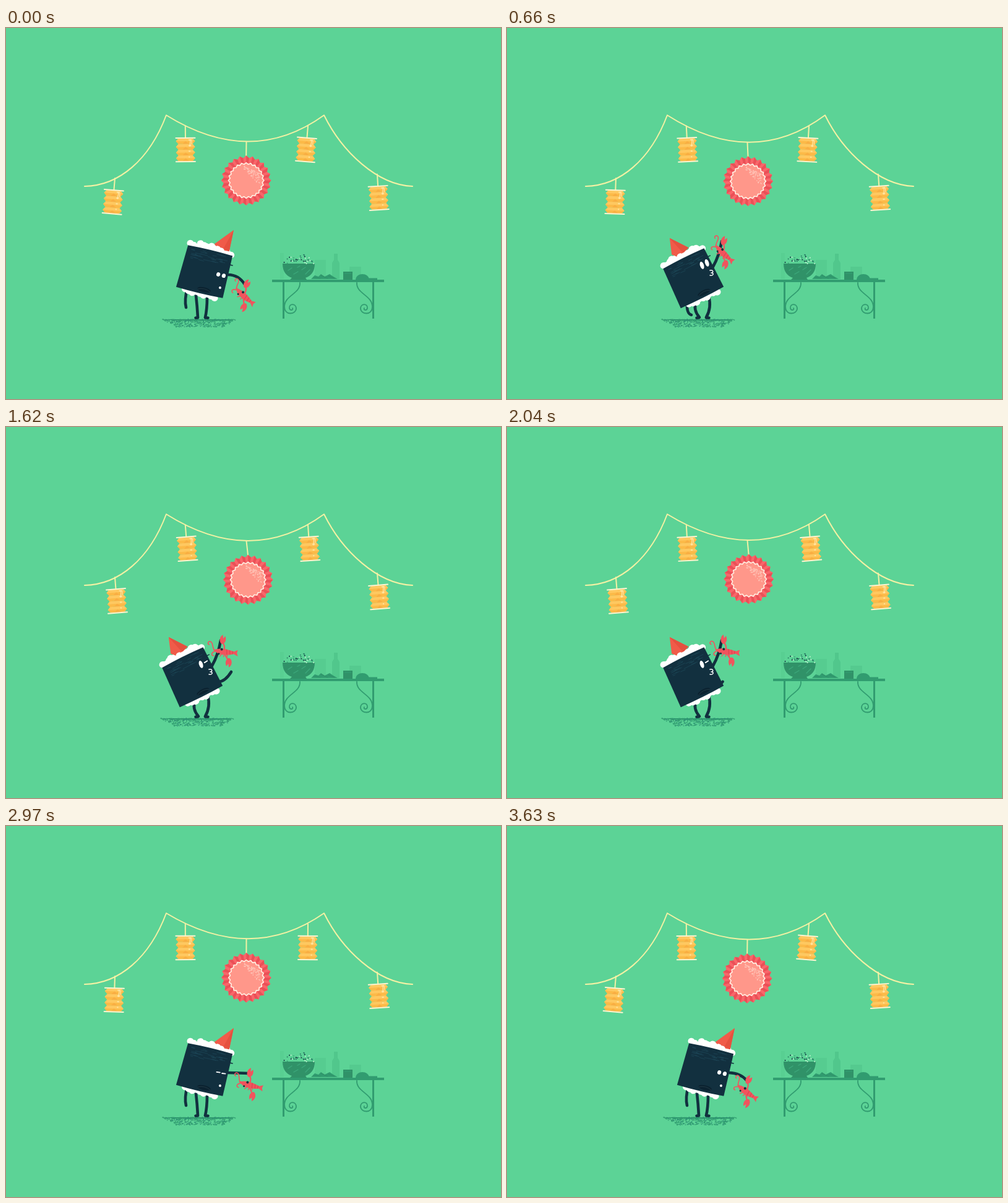
An HTML page with a canvas that plays this animation: 800x600 px, repeating every 3660 ms.

```html
<!DOCTYPE html>
<html>
<head>
<meta charset="utf-8">
<style>
html, body { margin: 0; width: 100%; height: 100%; overflow: hidden; background: #5cd396; }
canvas { display: block; }
</style>
</head>
<body>
<canvas id="stage" width="800" height="600"></canvas>
<script>
const ctx = document.getElementById('stage').getContext('2d');
const LOOP = 3660, TAU = Math.PI * 2, DEG = Math.PI / 180;
const NAVY = '#12303f', TABLE = '#319c70', DARK = '#309268', RED = '#f1545d', WIRE = '#f3f1a4';

const mix = (a, b, k) => a.map((v, i) => v + (b[i] - v) * k);
const swing = (t, shift = 0) => Math.cos(TAU * (t - shift) / LOOP);
function smooth(from, to, t) {
  const u = Math.min(1, Math.max(0, (t - from) / (to - from)));
  return u * u * (3 - 2 * u);
}
function random(seed) {
  return () => (seed = (seed * 16807) % 2147483647) / 2147483647;
}

function fill(d, color) { ctx.fillStyle = color; ctx.fill(new Path2D(d)); }
function stroke(d, color, width) {
  ctx.strokeStyle = color; ctx.lineWidth = width;
  ctx.lineCap = ctx.lineJoin = 'round';
  ctx.stroke(new Path2D(d));
}
function oval(x, y, rx, ry, color, turn = 0) {
  ctx.fillStyle = color;
  ctx.beginPath(); ctx.ellipse(x, y, rx, ry, turn, 0, TAU); ctx.fill();
}
function rect(x, y, w, h, color) { ctx.fillStyle = color; ctx.fillRect(x, y, w, h); }
function at(x, y, degrees, draw) {
  ctx.save(); ctx.translate(x, y); ctx.rotate(degrees * DEG); draw(); ctx.restore();
}
const limb = p => stroke(`M${p[0]} ${p[1]}Q${p[2]} ${p[3]} ${p[4]} ${p[5]}`, NAVY, 4.6);

function lantern(x, y, angle) {
  at(x, y, angle, () => {
    stroke('M0 0V19', WIRE, 2);
    for (let i = 0; i < 4; i++) {
      const top = 20 + i * 9.2;
      fill(`M-11.5 ${top}H11.5L15.5 ${top + 4.6}L11.5 ${top + 9.2}H-11.5L-15.5 ${top + 4.6}Z`, '#fcba48');
      fill(`M-11.5 ${top}H11.5L15.5 ${top + 4.6}H-15.5Z`, '#ffc860');
      fill(`M-5 ${top + 9.2}L0 ${top + 4.6}L6 ${top + 9.2}Z`, '#f9ae43');
      rect(5, top + 1.5, 5 - i, 2, '#ffe39b');
    }
    stroke('M8 22L7 33M10 24V29', '#ffe8ad', 1.2);
    stroke('M-15.5 19.3H15.5M-15.5 57.6H15.5', '#fff4cf', 2);
  });
}

function zigzag(count, outer, inner) {
  let d = '';
  for (let i = 0; i < count * 2; i++) {
    const r = i % 2 ? inner : outer, a = i * Math.PI / count;
    d += (i ? 'L' : 'M') + r * Math.cos(a) + ' ' + r * Math.sin(a);
  }
  return d + 'Z';
}

function rosette(x, y) {
  at(x, y, 0, () => {
    fill(zigzag(24, 40.5, 36.5), '#f9666a');
    for (let i = 0; i < 24; i++) {
      at(0, 0, i * 15, () => fill('M40 0L36.3 4.8L28 3.6V0Z', '#ea5057'));
    }
    fill(zigzag(24, 28.8, 26.2), '#ff978a');
    stroke(zigzag(24, 28.8, 26.2), '#fff1e4', 1.6);
    const r = random(91);
    for (let i = 0; i < 90; i++) {
      const u = r(), v = r();
      rect(-4 + u * 25, -24 + u * 12 + v * (5 + 15 * u * v), 1.6, 1.3, '#ffc2b5');
    }
  });
}

function garland(t) {
  const dip = 1.4 * Math.sin(TAU * t / LOOP);
  const x = 389.6 - 1.6 * swing(t, -260);
  stroke(`M127 256C183 255 232 213 259 141Q396 ${226 + 2 * dip} 514 141C543 200 600 254 657 256`, WIRE, 2);
  stroke(`M388.5 ${184 + dip}L${x} ${208 + dip}`, WIRE, 2);
  rosette(x, 246.6 + dip);
  lantern(176, 243, 4.8 * swing(t));
  lantern(289.8, 158.5, -2.2 + 2.2 * swing(t, -430));
  lantern(488, 158.5, 4.8 * swing(t, 170));
  lantern(600, 236.5, -4 + 0.7 * swing(t));
}

function table() {
  rect(443, 364, 6, 42, '#58cf92');
  rect(499, 375, 18, 31, '#56cc90');
  fill('M527 406V380L530 375V365H536V375L539 380V406Z', '#51c78c');
  rect(555, 386, 19, 20, '#55ca8f');
  rect(430, 407, 181, 4, TABLE);
  rect(447, 411, 3, 59, TABLE);
  rect(592, 411, 3, 59, TABLE);
  const scroll = 'M475 412C476 430 450 432 450 451C450 465 468 464 469 454C469 445 457 445 458 453C459 458 465 456 463 453';
  stroke(scroll, TABLE, 1.8);
  ctx.save(); ctx.translate(1042, 0); ctx.scale(-1, 1);
  stroke(scroll, TABLE, 1.8);
  ctx.restore();

  fill('M447 381H499C499 394 493 401 484 404L486 407H459L462 404C453 401 447 394 447 381Z', DARK);
  stroke('M456 392L462 388M465 398L472 394M478 391L484 387M484 398L491 391M471 387L475 385', '#3daa7c', 1.2);
  const r = random(37), tones = ['#c4f2d2', NAVY, '#2b7d66', '#3aa577'];
  for (let i = 0; i < 40; i++) {
    const a = r() * Math.PI, q = Math.sqrt(r());
    oval(474 + 25 * q * Math.cos(a), 381 - 15 * q * Math.sin(a), 1, 1, tones[i % 4]);
  }
  fill('M493 406L499 400L505 402L509 398L515 402L523 398L529 402L536 406Z', TABLE);
  stroke('M497 403L508 405M509 400L520 405M521 401L531 405', DARK, 1.2);
  rect(545, 394, 15, 13, DARK);
  rect(547, 396, 11, 1.5, TABLE);
  fill('M565 407C566 395 586 395 587 407Z', TABLE);
  rect(586, 404.5, 14, 2.5, TABLE);
}

function shadow(k) {
  const r = random(512), x0 = 312 - 3 * k;
  fill(`M${x0 - 50} 471H${x0 + 56}L${x0 + 50} 473.5H${x0 - 42}Z`, TABLE);
  for (let i = 0; i < 480; i++) {
    const v = r() ** 1.5, half = 60 * Math.sqrt(1 - v * 0.6);
    rect(x0 + (r() * 2 - 1) * half, 470.5 + v * 12.5, 1.5, 1.3, i % 5 ? TABLE : '#2d8c78');
  }
}

function shrimp(x, y, clawTurn, bodyTurn) {
  at(x, y, clawTurn, () => {
    stroke('M0 3Q5 9 1 17Q2 26 7 34', RED, 2.2);
    for (const [cx, cy, turn] of [[1, -1, 12], [7, 37, 190]]) {
      at(cx, cy, turn, () => fill('M-1 7C-6 3 -5 -5 0 -8L1 -2L4 -6C7 0 5 5 1 7Z', RED));
    }
  });
  const a = clawTurn * DEG;
  at(x + 2 * Math.cos(a) - 19 * Math.sin(a), y + 2 * Math.sin(a) + 19 * Math.cos(a), bodyTurn, () => {
    stroke('M-16 -1C-21 -3 -19 -12 -24 -14C-28 -15 -30 -10 -26 -9M-16 1C-21 3 -22 8 -17 8', RED, 1.6);
    fill('M-19 -1Q-6 -7 8 -3.5L15 -2L21 -5L20 0L22 5L15 2Q2 7 -10 4Z', RED);
    stroke('M3 -4L4 4M8 -3L9 3M13 -2V2', '#d8404e', 0.9);
    stroke('M-5 5L-7 8M0 5L-1 8M5 4V7', RED, 1.4);
    oval(-5, -3.5, 2, 2, NAVY);
    oval(-9, 4, 1.5, 1.5, NAVY);
  });
}

function rice(from, to, y) {
  for (let x = from, i = 0; x <= to; x += 6.2, i++) {
    oval(x, y + (i % 3 - 1) * 1.6, 5.6, 5.2, '#fff');
  }
}

function face(t, k) {
  const blink = t > 2900 && t < 3045, wink = t > 840 && t < 2260, kiss = t > 520 && t < 2330;
  const y = -0.5 - 11.2 * k;
  [21.6, 30.6].forEach((x, i) => {
    if (blink || (wink && i)) stroke(`M${x - 2.8} ${y}L${x + 2.6} ${y - 0.6}`, '#fff', 1.8);
    else oval(x, y, 3.1, 3.4 + 2.8 * k, '#fff', k * 0.15);
  });
  if (kiss) {
    at(29.5, 5.8, 26, () => stroke('M-2 -4C4 -5 4 0 0 0C5 0 4 5 -2 4', '#fff', 1.5));
  } else oval(29.3, 19.7 - 11 * k, 2, 2, '#fff');
}

function roll(t, k) {
  const [x, y, angle] = mix([322, 394, 13.5], [301, 404, -26.5], k);
  at(x, y, angle, () => {
    rice(-34, 38, -37.5);
    rice(-18, 26, -41);
    rice(-25, 26, 36.5);
    const [lx, ly, tx, ty, rx, ry] = mix([4, -47, 29, -76, 30, -41], [-14.4, -49, -5.5, -74.5, 15, -47], k);
    fill(`M${lx} ${ly}L${tx} ${ty}L${rx} ${ry}L${lx + 8} -40Z`, '#f05b49');
    fill(`M${(lx + rx) / 2 + 3} -43L${tx} ${ty}L${rx} ${ry}Z`, '#e5513f');
    rice(-8 - 14 * k, 20 - 4 * k, -38.5);
    fill('M-37 -35Q0 -37 37 -35L37.5 35Q0 37 -40 35Z', NAVY);
    const r = random(77);
    for (let i = 0; i < 34; i++) {
      const sx = -30 + r() * 50, sy = -32 + r() * 16;
      stroke(`M${sx} ${sy}l${3 + r() * 10} ${r() - 0.5}`, '#1d4858', 0.7);
    }
    oval(5, 29, 11, 4, '#0b2230');
    stroke('M-5 30Q5 25 15 30', '#253d48', 0.8);
    stroke('M34 -20H40.5', NAVY, 1.4);
    face(t, k);
  });
}

function legs(k) {
  limb(mix([307, 432, 309, 450, 310, 468], [306, 442, 300, 455, 311, 468], k));
  limb(mix([325, 436, 325, 455, 322, 468], [326, 434, 331, 452, 322, 468], k));
  stroke('M310 468.5L306.5 468.8M322 468.5L326.5 468.8', NAVY, 4.6);
}

function backArm(t, k) {
  const raise = smooth(1150, 1500, t) - smooth(1900, 2350, t);
  const low = mix([293, 421, 288, 440, 291, 452], [291, 444, 290, 462, 298, 464], k);
  limb(mix(low, [343, 412, 354, 412, 364, 396], raise));
}

// The hand droops before the leap, then dangles the shrimp and reaches out once.
function frontArm(t, k) {
  const droop = smooth(3480, 3800, t < LOOP / 2 ? t + LOOP : t);
  const reach = smooth(720, 1020, t) - smooth(1020, 1400, t);
  const [sx, sy, hx, hy, bendX, bendY, claw, body] = mix(
    [359, 399, 391 - 9 * droop, 400 + 24 * droop, 4, -12 * droop, 2 + 22 * droop, 14 + 45 * droop],
    [333, 386, 347 + 14 * reach, 345 + 10 * reach, 3, 3, 12 - t * 0.0117, 42 - 36 * smooth(660, 1000, t)],
    k);
  limb([sx, sy, (sx + hx) / 2 + bendX, (sy + hy) / 2 + bendY, hx, hy]);
  shrimp(hx + 2, hy, claw, body);
}

function draw(t) {
  const k = smooth(130, 480, t) - smooth(2560, 2850, t);
  rect(0, 0, 800, 600, '#5cd396');
  garland(t);
  table();
  shadow(k);
  legs(k);
  backArm(t, k);
  roll(t, k);
  frontArm(t, k);
}

const start = performance.now();
function tick() {
  draw((performance.now() - start) % LOOP);
  requestAnimationFrame(tick);
}
tick();
</script>
</body>
</html>
```
